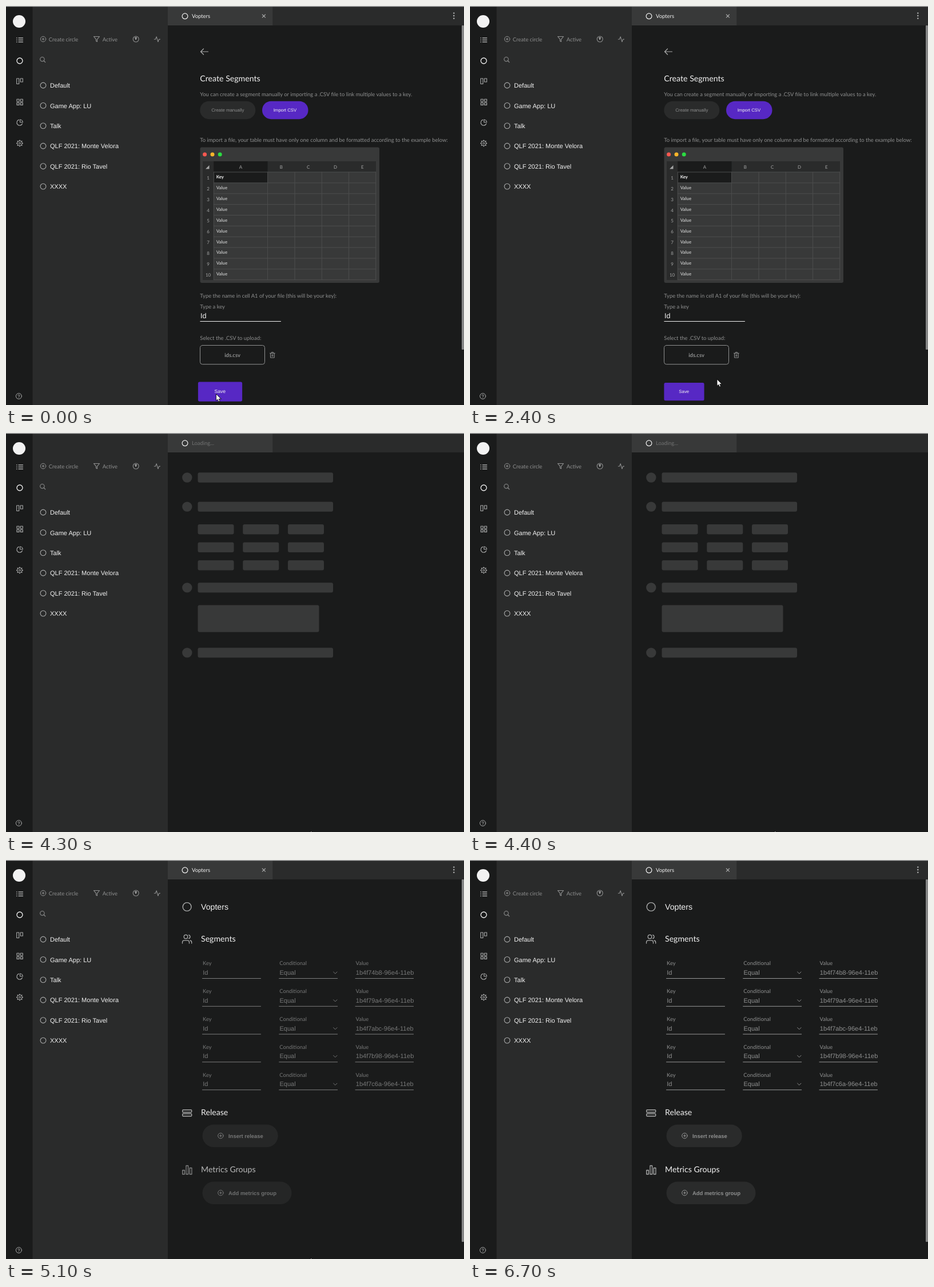
An HTML page for the animation above (7700 ms loop, 801 px wide and 699 px high).

```html
<!DOCTYPE html>
<html lang="en">
<head>
<meta charset="utf-8">
<title>Create segments</title>
<style>
  html, body { margin: 0; width: 100%; height: 100%; overflow: hidden; background: #1a1b1b; }
  svg { display: block; width: 801px; height: 699px; fill: none; stroke-linecap: round; stroke-linejoin: round; }
  text { font: 9.45px Lato, sans-serif; fill: #8f9090; text-rendering: geometricPrecision; }
  .item { font: 11.02px "Liberation Sans", Arial, sans-serif; }
  .btn { font: 7.87px "Liberation Sans", Arial, sans-serif; text-anchor: middle; }
  .pill { font: bold 9.45px "Liberation Sans", Arial, sans-serif; }
  .title { font-size: 14.17px; fill: #f2f2f2; }
  .arial { font-family: "Liberation Sans", Arial, sans-serif; }
  .typed { font-size: 12.6px; }
  .file { font-weight: bold; text-anchor: middle; }
  .cell { font-size: 7.87px; font-weight: bold; fill: #b9baba; }
  .head { font-size: 8px; text-anchor: middle; fill: #a5a6a6; }
  .dim { fill: #727373; }
  .white { fill: #f2f2f2; }
</style>
</head>
<body>
<svg id="stage" viewBox="0 0 801 699"></svg>
<script>
const BG = '#1a1b1b', PANEL = '#2a2b2b', LIGHT = '#383939', PURPLE = '#5728c4';
const GREY = '#8f9090', WHITE = '#f2f2f2', ICON = '#abacac', NAME = 'Vopters';

const rect = (x, y, w, h, fill, rx = 0, extra = '') =>
  `<rect x="${x}" y="${y}" width="${w}" height="${h}" rx="${rx}" fill="${fill}" ${extra}/>`;
const dot = (x, y, r, fill) => `<circle cx="${x}" cy="${y}" r="${r}" fill="${fill}"/>`;
const ring = (x, y, r, color = GREY, width = 1.1) =>
  `<circle cx="${x}" cy="${y}" r="${r}" stroke="${color}" stroke-width="${width}"/>`;
const path = (d, color = GREY, width = 1.1, extra = '') =>
  `<path d="${d}" stroke="${color}" stroke-width="${width}" ${extra}/>`;
const text = (x, y, s, cls = '') => `<text x="${x}" y="${y}" class="${cls}">${s}</text>`;
const group = (id, body) => `<g id="${id}">${body}</g>`;
const repeat = (n, fn) => Array.from({ length: n }, (_, i) => fn(i)).join('');
const plus = (x, y, color = GREY) => ring(x, y, 4.7, color, 1) + path(`M${x - 2} ${y}h4m-2-2v4`, color, 1);

function sidebar() {
  const items = ['Default', 'Game App: LU', 'Talk', 'QLF 2021: Monte Velora', 'QLF 2021: Rio Tavel', 'XXXX'];
  return rect(46.5, 0, 236.5, 699, PANEL) +
    dot(23, 27, 11, WHITE) +
    path('M18.5 56h.6m-.6 3.5h.6m-.6 3.5h.6M22 56h7.5M22 59.5h7.5M22 63h7.5', ICON, 1.3) +
    ring(24, 96, 5, WHITE, 1.3) +
    path('M18.7 127h4v9.5h-4zM25.3 127h4v6h-4z', ICON) +
    path('M19 163.3h4v4h-4zM25.3 163.3h4v4h-4zM19 169.4h4v4h-4zM25.3 169.4h4v4h-4z', ICON) +
    path('M28.6 206a5 5 0 1 1-6-6.6M24.5 199a5 5 0 0 1 4.8 4.8h-4.8z', ICON) +
    ring(24, 240.5, 1.6, ICON, 1) + ring(24, 240.5, 4.3, ICON, 1) +
    path(repeat(8, i => {
      const a = i * Math.PI / 4, c = Math.cos(a), s = Math.sin(a);
      return `M${24 + 4.5 * c} ${240.5 + 4.5 * s}l${c * .8} ${s * .8}`;
    }), ICON, 1.6) +
    ring(22.4, 683.5, 5, ICON, 1) + path('M20.9 682.3a1.5 1.5 0 1 1 1.6 1.7v.4m0 1.7v.1', ICON, 1) +
    plus(65, 58) + text(74.7, 61.5, 'Create circle') +
    path('M153.5 53.5h10l-4 4.8v4.2l-2-1v-3.2z') + text(168.7, 61.5, 'Active') +
    ring(227.2, 58, 5) + path('M227.2 55v3.2M225.8 55.2h2.8l-1.4 3.5z', ICON, 1) +
    path('M259.3 58.3h2.2l1.7-4.5 2.7 9 1.7-4.5h2') +
    ring(63.4, 93.2, 3.7) + path('M66.2 96l2.6 2.6') +
    items.map((s, i) => {
      const y = 139 + i * 35.42;
      return ring(65, y, 4.9, ICON) + text(77, y + 4.2, s, 'item white');
    }).join('');
}

function sheet() {
  const cols = [363.3, 457.6, 505, 552.3, 599.6, 646.8], step = 18.87;
  return rect(339.5, 247.5, 313.5, 237.5, LIGHT, 3) +
    dot(347.6, 260, 3.5, '#fb5850') + dot(361, 260, 3.5, '#f7b52a') + dot(374.2, 260, 3.5, '#2bdc42') +
    rect(344, 272, 303, 19, PANEL) + rect(344, 272, 19.3, 208, PANEL) + rect(363.3, 272, 94.3, 19, BG) +
    '<path d="M355.5 279v6.5h-6.5z" fill="#a5a6a6"/>' +
    rect(363.3, 291, 94.3, 18.8, BG) +
    path(repeat(11, i => `M363.3 ${291 + i * step}H646.8`) + cols.map(x => `M${x} 291V479.7`).join(''), '#4d4e4e', 1) +
    [...'ABCDE'].map((s, i) => text((cols[i] + cols[i + 1]) / 2, 285, s, 'head')).join('') +
    repeat(10, i => text(353.6, 304 + i * step, i + 1, 'head') +
      text(367.7, 302.3 + i * step, i ? 'Value' : 'Key', i ? 'cell' : 'cell white'));
}

function form() {
  return path('M353.5 80h-13m5-5l-5 5 5 5', ICON, 1.2) +
    text(339.3, 132, 'Create Segments', 'title') +
    text(339.3, 157.5, 'You can create a segment manually or importing a .CSV file to link multiple values to a key.') +
    rect(339.3, 166.7, 97, 31.5, PANEL, 15.7) + text(387.8, 184.9, 'Create manually', 'btn') +
    rect(448, 166.7, 80.5, 31.5, PURPLE, 15.7) + text(488, 184.9, 'Import CSV', 'btn white') +
    text(339.3, 238, 'To import a file, your table must have only one column and be formatted according to the example below:') +
    sheet() +
    text(339.3, 511, 'Type the name in cell A1 of your file (this will be your key):') +
    text(339.3, 530, 'Type a key') +
    text(340, 546.7, 'Id', 'arial typed white') +
    path('M351.2 537v11.5', WHITE, 1, 'id="caret"') +
    path('M339.8 552.5H480.5', WHITE, 1, 'id="line"') +
    text(339.3, 585, 'Select the .CSV to upload:') +
    rect(339.5, 594.5, 113, 33.2, 'none', 4, `stroke="${GREY}"`) +
    text(396.1, 615, 'ids.csv', 'file') +
    path('M461.5 608.3h8.8m-5.9 0v-1.7h3v1.7m1.9 0v7.8h-6.8v-7.8m2.5 2.3v3.2m1.8-3.2v3.2', GREY, 1) +
    group('save', rect(339.4, 660, 70.2, 31.3, PURPLE, 2.5) + text(374.3, 677.8, 'Save', 'btn white')) +
    group('wait', text(339.3, 667.5, 'Wait, performing importing...', 'dim') +
      rect(339.4, 682, 52, 31.5, '#2e1b5a', 2.5) +
      group('spinner', ring(365.4, 695, 4, '#45337a', 1.5) + path('M365.4 686a9 9 0 1 1-9 9', '#45337a', 1.5)));
}

function skeleton() {
  return [69.3, 120.4, 262.2, 376.2].map(y =>
      dot(316.8, y + 8.7, 8.7, LIGHT) + rect(335.5, y, 236.5, 17.4, LIGHT, 3)).join('') +
    repeat(9, i => rect(335.5 + i % 3 * 78.75, 160 + Math.floor(i / 3) * 31.5, 63, 17.4, LIGHT, 3)) +
    rect(335.5, 301.5, 212, 47.3, LIGHT, 3);
}

function details() {
  const values = ['74b8', '79a4', '7abc', '7b98', '7c6a'];
  const underlined = (x, y, label, value) =>
    text(x + .5, y + 3.3, label) + text(x + .8, y + 20, value, 'item') + path(`M${x} ${y + 26.5}h102`, '#979898', 1);
  const action = (y, w, label) =>
    rect(343.5, y, w, 39.4, PANEL, 19.7) + plus(375.4, y + 19.6, '#979898') + text(389, y + 23, label, 'pill');
  const bar = y => rect(308.7, y, 16, 4.2, 'none', 1.2, `stroke="${ICON}" stroke-width="1.4"`);
  return group('heading', ring(316.6, 82, 7.4, ICON, 1.4) + text(341, 87, NAME, 'title arial') +
      path('M320.5 146v-1.8a3.3 3.3 0 0 0-3.3-3.3h-5.4a3.3 3.3 0 0 0-3.3 3.3v1.8' +
        'M324.7 146v-1.8a3.3 3.3 0 0 0-2.5-3.2M319.7 131.3a3.3 3.3 0 0 1 0 6.3', ICON, 1.3) +
      ring(314.5, 134.4, 3.3, ICON, 1.3) + text(341, 142.6, 'Segments', 'title') +
      bar(437.8) + bar(444.5) + text(341, 447.3, 'Release', 'title')) +
    group('fields', '<clipPath id="clip"><path d="M300 170H713V420H300z"/></clipPath><g clip-path="url(#clip)">' +
      values.map((v, i) => {
        const y = 181 + i * 48.8;
        return underlined(343.5, y, 'Key', 'Id') + underlined(477.7, y, 'Conditional', 'Equal') +
          path(`M572.6 ${y + 15}l3.2 3.2 3.2-3.2`, GREY, 1) + underlined(611, y, 'Value', `1b4f${v}-96e4-11eb`);
      }).join('') + '</g>' + action(463.5, 132.3, 'Insert release')) +
    group('metrics', path('M308.7 543.5h3.6v7h-3.6zM315 535.5h3.6v15h-3.6zM321.3 539.5h3.6v11h-3.6z', ICON, 1.3) +
      text(341, 547, 'Metrics Groups', 'title') + action(563.5, 156, 'Add metrics group'));
}

const beam = 'M-2-5.5h1.5l.5.5.5-.5h1.5M0-5v10M-2 5.5h1.5l.5-.5.5.5h1.5';
const stage = document.getElementById('stage');
stage.innerHTML = rect(0, 0, 801, 699, BG) + sidebar() +
  rect(283, 0, 518, 34, PANEL) + rect(283, 0, 183.3, 34, LIGHT) + ring(313, 17.8, 4.9, WHITE, 1.2) +
  group('tab', text(325, 21.3, NAME, 'white') + path('M448.3 15l5.2 5.2m0-5.2l-5.2 5.2', ICON) +
    repeat(3, i => dot(783.3, 12.5 + i * 4.6, 1.3, ICON))) +
  group('loading', text(325, 21.3, 'Loading...', 'dim')) +
  rect(0, 0, 801, 1.2, '#b8b9b9') +
  group('form', form()) + group('skeleton', skeleton()) + group('details', details()) +
  rect(797, 34, 4, 568, '#858686', 1, 'id="thumb"') +
  group('arrow', '<path d="M0 0V11.6L2.6 9.2 4.4 13.2 6.5 12.3 4.8 8.4H8.4Z" fill="#fff" stroke="#000" stroke-width=".8"/>') +
  group('beam', path(beam, '#000', 2.4) + path(beam, '#fff', 1.1));

const el = {};
stage.querySelectorAll('[id]').forEach(e => el[e.id] = e);
const show = (id, on) => el[id].style.display = on ? '' : 'none';
const inside = (p, x0, y0, x1, y1) => p.x > x0 && p.x < x1 && p.y > y0 && p.y < y1;

// Moments in ms when the page changes
const FOCUS = 1500, BLUR = 2000, IMPORT = 3100, LOADING = 4200, READY = 4800, LEAVE = 6100;

// Pointer stops: time, x, y
const trail = [
  [0, 367.5, 680], [500, 367.5, 680], [1100, 361, 545], [1700, 361, 545], [2000, 596, 532], [2100, 596, 532],
  [2200, 534, 559], [2300, 534, 559], [2400, 432, 654], [2800, 380, 664], [3800, 380, 664], [4300, 533, 697], [7700, 533, 697]
];
function pointerAt(t) {
  const i = trail.findIndex(k => k[0] > t), [t0, x0, y0] = trail[i - 1], [t1, x1, y1] = trail[i];
  const k = (t - t0) / (t1 - t0);
  return { x: x0 + (x1 - x0) * k, y: y0 + (y1 - y0) * k };
}

function draw(time) {
  let t = Math.floor(time / 100) * 100;
  if (t > 5100 && t < 5400) t = 5100;
  const importing = t >= IMPORT, formOn = t < LOADING, detailsOn = t >= READY;
  const skeletonOn = !formOn && !detailsOn;
  show('form', formOn);
  show('skeleton', skeletonOn);
  show('loading', skeletonOn);
  show('tab', !skeletonOn);
  show('details', detailsOn);
  show('thumb', !skeletonOn);
  el.thumb.setAttribute('height', detailsOn ? 635 : importing ? 552 : 568);

  const p = pointerAt(t), focused = t >= FOCUS && t < BLUR;
  show('caret', focused);
  el.line.setAttribute('stroke', focused ? '#4c51b4' : WHITE);

  const scale = inside(p, 339, 660, 410, 691) ? 1.1 : 1;
  show('save', !importing);
  show('wait', importing);
  el.save.setAttribute('transform', `translate(374.5 675.6) scale(${scale}) translate(-374.5 -675.6)`);
  el.spinner.setAttribute('transform', `rotate(${t * .36} 365.4 695)`);

  const overText = inside(p, 339, 533, 481, 553) || importing && formOn && inside(p, 339, 656, 459, 672);
  show('beam', overText);
  show('arrow', !overText && t < LEAVE);
  el[overText ? 'beam' : 'arrow'].setAttribute('transform', `translate(${p.x} ${p.y})`);

  const fade = (id, duration) =>
    el[id].setAttribute('opacity', Math.max(0, Math.min(1, (t - READY + 100) / duration)));
  fade('heading', 400);
  fade('fields', 500);
  fade('metrics', 550);
}

const start = performance.now();
function tick() {
  draw((performance.now() - start) % 7700);
  requestAnimationFrame(tick);
}
tick();
</script>
</body>
</html>
```
